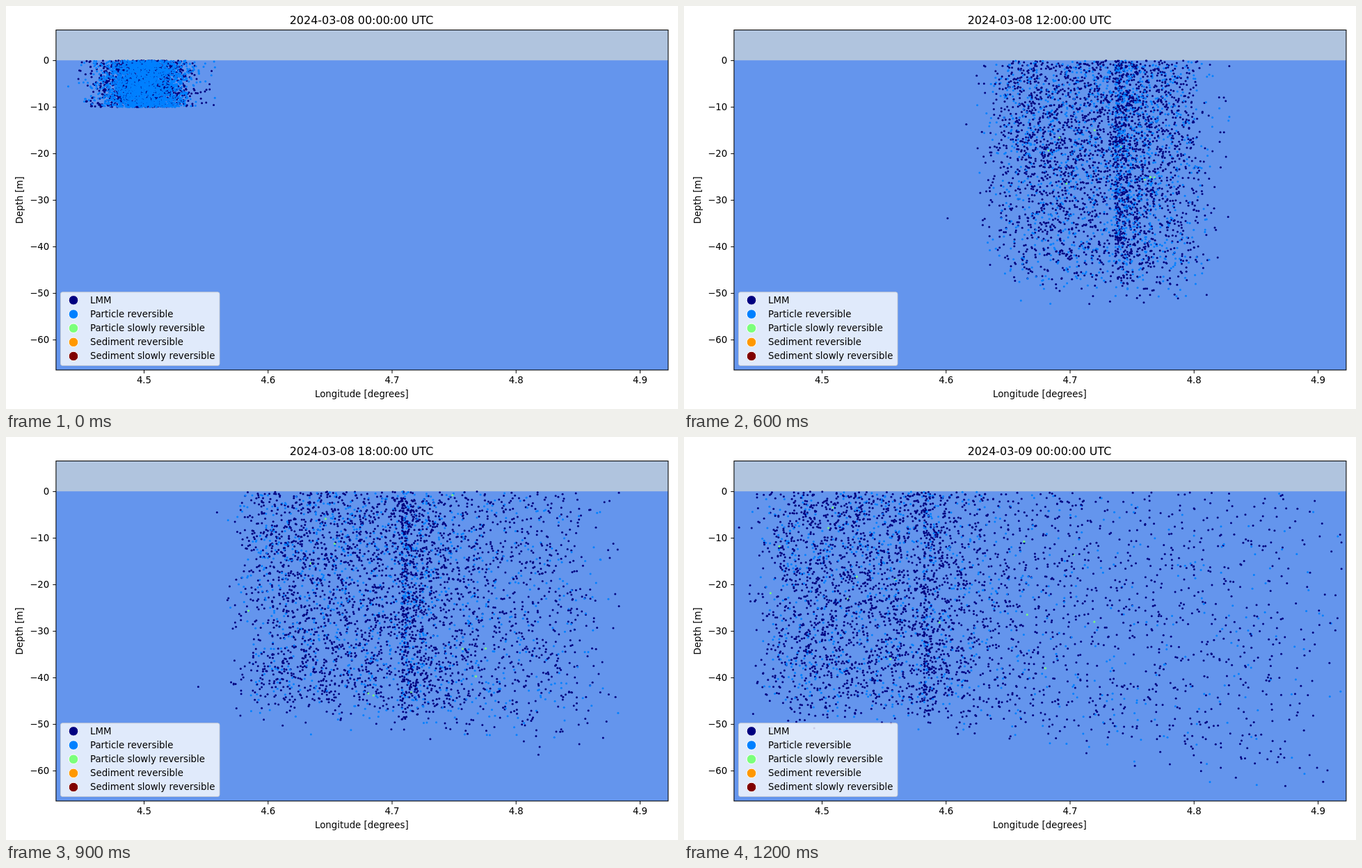
Animation of 966 by 580 pixels, one loop 1250 ms. Source, as an HTML page with a canvas:

```html
<!DOCTYPE html>
<html lang="en">
<head>
<meta charset="utf-8">
<title>Particle depth over longitude</title>
<style>
  html, body { margin: 0; width: 100%; height: 100%; overflow: hidden; background: #fff; }
  svg, canvas { position: absolute; left: 0; top: 0; display: block; }
  text { font-family: "DejaVu Sans", sans-serif; font-size: 13.33px; fill: #000; }
</style>
</head>
<body>
<svg width="966" height="580">
  <rect x="72" y="34.5" width="880" height="489.5" fill="#6495ed"/>
  <rect x="72" y="34.5" width="880" height="43.7" fill="#b0c4de"/>
</svg>
<canvas id="dots" width="966" height="580"></canvas>
<svg id="front" width="966" height="580">
  <rect x="71.9" y="34.5" width="880" height="489.4" fill="none" stroke="#000" stroke-width="1.05"/>
  <text id="clock" x="511" y="26.2" text-anchor="middle" style="font-size:16px"></text>
  <text x="511.3" y="562.7" text-anchor="middle">Longitude [degrees]</text>
  <text transform="translate(24.3 279.3) rotate(-90)" text-anchor="middle">Depth [m]</text>
  <rect x="78.5" y="411.8" width="228.5" height="105.7" rx="2.7" fill="#fff" fill-opacity=".8" stroke="#ccc" stroke-opacity=".8"/>
</svg>
<script>
const STEP = 50, HOURS = 25, COUNT = 4200;
const KINDS = [
  ['LMM', '#000080'],
  ['Particle reversible', '#0080ff'],
  ['Particle slowly reversible', '#7bff7b'],
  ['Sediment reversible', '#ff9800'],
  ['Sediment slowly reversible', '#800000']
];
const [LMM, PARTICLE, SLOW] = [0, 1, 2];

const front = document.getElementById('front');
const clock = document.getElementById('clock');
const ctx = document.getElementById('dots').getContext('2d');

const px = lon => 198.5 + (lon - 4.5) * 1782.5;
const py = depth => 78.6 + depth * 6.7;
const pad = n => String(n).padStart(2, '0');

let seed = 20417;
function random() {
  seed = (seed + 0x6D2B79F5) | 0;
  let v = Math.imul(seed ^ (seed >>> 15), 1 | seed);
  v = (v + Math.imul(v ^ (v >>> 7), 61 | v)) ^ v;
  return ((v ^ (v >>> 14)) >>> 0) / 4294967296;
}
const gauss = () =>
  Math.sqrt(-2 * Math.log(1 - random())) * Math.cos(2 * Math.PI * random());

function smooth(from, to, t) {
  const f = Math.max(0, Math.min(1, (t - from) / (to - from)));
  return f * f * (3 - 2 * f);
}

function add(tag, attrs, text = '') {
  const el = document.createElementNS('http://www.w3.org/2000/svg', tag);
  for (const key in attrs) el.setAttribute(key, attrs[key]);
  el.textContent = text;
  front.append(el);
}

function drawAxes() {
  for (let i = 0; i < 5; i++) {
    const lon = 4.5 + i / 10, x = px(lon);
    add('path', { d: `M${x} 524v4.7`, stroke: '#000' });
    add('text', { x, y: 543.4, 'text-anchor': 'middle' }, lon.toFixed(1));
  }
  for (let depth = 0; depth <= 60; depth += 10) {
    const y = py(depth);
    add('path', { d: `M67.3 ${y}h4.7`, stroke: '#000' });
    add('text', { x: 62.3, y: y + 4.8, 'text-anchor': 'end' }, depth ? '\u2212' + depth : '0');
  }
  KINDS.forEach(([label, fill], i) => {
    const y = 423.4 + i * 20.15;
    add('circle', { cx: 97, cy: y, r: 6.8, fill, stroke: '#fff' });
    add('text', { x: 121, y: y + 4.4 }, label);
  });
}

// The tide carries the cloud east and back; its left half trails behind,
// while its right half escapes east and sinks.
function place(p, hour) {
  const drift = 0.24 * Math.sin(Math.PI * hour / 27);
  let lon = 4.5 + drift + 0.017 * p.score, depth = p.depth;
  if (p.score < 0) {
    lon += 0.088 * smooth(4, 17, hour) * Math.tanh(p.score);
  } else {
    const escape = 0.28 * (hour / 24) ** 3 * (1 - Math.exp(-((p.score / 1.3) ** 2)));
    lon += escape;
    depth *= 1 + 1.1 * escape;
  }
  return [px(lon), py(depth)];
}

// Vertical mixing between the surface and a soft floor, and random exchange of kinds
function advance(p) {
  p.depth = Math.abs(p.depth + 8.2 * gauss());
  if (p.depth > p.floor) p.depth = Math.abs(2 * p.floor - p.depth);
  if (random() < (p.kind === LMM ? 0.009 : 0.058)) p.kind = 1 - p.kind;
}

function simulate() {
  const cloud = Array.from({ length: COUNT }, (_, i) => ({
    score: gauss(),
    depth: random() * 10,
    floor: 46.5 + 2.8 * gauss(),
    kind: i < COUNT * 0.47 ? LMM : PARTICLE,
    // A few particles turn slow, one more every two hours
    slowFrom: i % 300 === 299 ? Math.max(1, (i - 299) / 150 - 2) : Infinity
  }));
  const hours = [];
  for (let h = 0; h < HOURS; h++) {
    if (h) cloud.forEach(advance);
    hours.push(cloud.map(p => [...place(p, h), h >= p.slowFrom ? SLOW : p.kind]));
  }
  return hours;
}

function draw(hour) {
  clock.textContent = `2024-03-${pad(8 + Math.floor(hour / 24))} ${pad(hour % 24)}:00:00 UTC`;
  ctx.clearRect(0, 0, 966, 580);
  for (const [x, y, kind] of hours[hour]) {
    ctx.fillStyle = KINDS[kind][1];
    ctx.beginPath();
    ctx.arc(x, y, 1.5, 0, 2 * Math.PI);
    ctx.fill();
  }
}

drawAxes();
const hours = simulate();
ctx.beginPath();
ctx.rect(72, 35, 880, 489);
ctx.clip();

let shown = 0;
draw(0);
const start = performance.now();
function tick() {
  const hour = Math.floor((performance.now() - start) / STEP) % HOURS;
  if (hour !== shown) draw(shown = hour);
  requestAnimationFrame(tick);
}
requestAnimationFrame(tick);
</script>
</body>
</html>
```
